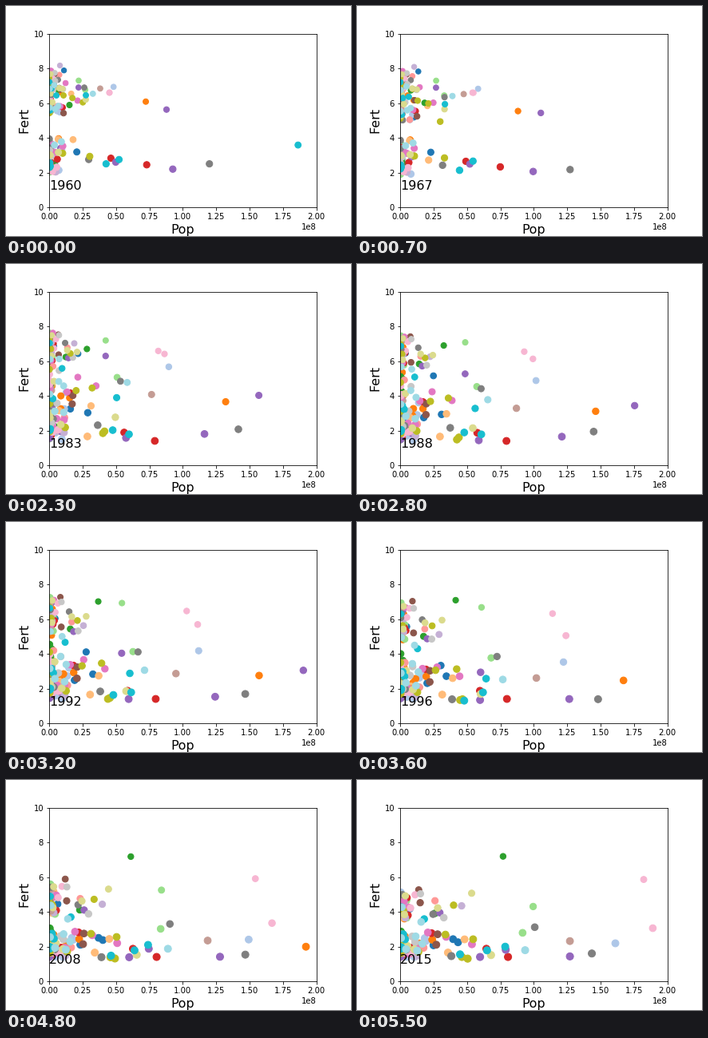
These frames come from a looping animation (432 px wide and 288 px high, 5600 ms). A matplotlib script:

```python
import numpy as np
import matplotlib.pyplot as plt
from matplotlib.animation import FuncAnimation

plt.rcParams["text.kerning_factor"] = 6

YEARS = np.arange(1960, 2016)
AGE = YEARS - YEARS[0]
LAG = 12  # years until births drive population growth
tracks = []  # (colour index, population per year, fertility per year)


def nation(color, pop, fert, mid, width=7, swing=0):
    """Fertility falls along an S-curve around `mid`; population (millions)
    grows between its two ends in step with earlier fertility.
    `swing` adds an early boom, a slump near 2000 and a population bulge."""
    high, low = fert

    def births(year):
        return low + (high - low) / (1 + np.exp((year - mid) / width))

    rate = np.maximum(births(YEARS - LAG) - 3 / high, 0.05)
    share = (np.cumsum(rate) - rate[0]) / rate[1:].sum()
    bulge = 1 + 0.2 * swing * np.sin(np.pi * AGE / AGE[-1])
    people = 1e6 * pop[0] * (pop[1] / pop[0]) ** share * bulge
    wave = np.exp(-AGE / 4) - np.exp(-((YEARS - 2000) / 6) ** 2)
    tracks.append((color, people, births(YEARS) + swing * wave))


# The large nations that stand apart from the crowd.
nation(0, (11.1, 39.6), (7.9, 2.4), 1988, 5)
nation(0, (20.7, 43.3), (3.2, 2.1), 1998, 9)
nation(1, (48.2, 161), (7, 2.05), 1990)
nation(2, (72.3, 204), (6.8, 1.75), 1978, 10)
nation(3, (17.9, 35.8), (4.2, 1.65), 1966, 3)
nation(3, (16.5, 48.2), (7.1, 2.4), 1974)
nation(4, (15.2, 77), (5.8, 7.2), 1979)
nation(5, (27, 91.6), (7.2, 2.5), 1985, 11)
nation(5, (22.1, 99.5), (7.3, 3.2), 2008)
nation(6, (46.2, 64.5), (2.85, 1.87), 1971, 3)
nation(6, (73, 80.7), (2.45, 1.4), 1971, 2)
nation(8, (87.8, 258), (5.75, 2.3), 1983)
nation(8, (22, 79), (6.9, 1.8), 1991, 4)
nation(8, (49.8, 59.8), (2.5, 1.4), 1978, 3, 0.1)
nation(8, (92.5, 127), (2.05, 1.43), 1985, 5, 0.15)
nation(9, (8.1, 46), (8.2, 4.3), 1988, 6)
nation(11, (38.2, 127), (7, 2.3), 1980, 6)
nation(12, (12.3, 34.4), (7.3, 2.5), 1984)
nation(12, (21.3, 53.7), (6.2, 2.1), 1985.5, 6)
nation(13, (45.2, 182.2), (6.6, 5.85), 1998, 4)
nation(13, (45, 189), (6.6, 2.95), 1997.5, 5)
nation(14, (26.3, 100.7), (8.2, 2.8), 1976, 14)
nation(14, (29.6, 38.3), (2.35, 1.45), 1992, 3, 0.4)
nation(14, (119.9, 143.4), (2.1, 1.6), 1990, 2.5, 0.4)
nation(16, (17.4, 54.6), (6.6, 2.3), 1983, 9)
nation(16, (25.2, 50.5), (6.8, 1.3), 1971, 6)
nation(16, (30.4, 46.2), (2.83, 1.4), 1981, 2.5, 0.1)
nation(16, (7.5, 40), (6.9, 4), 1998, 9)
nation(17, (10, 53.5), (6.85, 4.8), 1998, 9)
nation(17, (27.4, 68), (6.5, 1.5), 1976.5, 6)
nation(18, (27.5, 78.6), (7, 1.9), 1979, 9)
nation(18, (42.6, 44.8), (2.05, 1.55), 1990, 2.5, 0.45)
nation(18, (52.3, 65), (2.75, 1.78), 1971.5, 2)
nation(18, (186.2, 320), (3.7, 1.9), 1968, 3)
nation(19, (32.7, 93.5), (6.6, 1.75), 1986, 6)

# The crowd of small nations: early, middle and late fertility decline.
rng = np.random.default_rng(12)
families = (
    # high, low, mid year, growth
    ((2, 4), (1.4, 2), (1966, 1990), (1, 1.6)),
    ((5.5, 7.4), (1.8, 2.8), (1972, 1992), (2, 3.2)),
    ((6.2, 7.9), (3.3, 5), (1988, 2006), (2.8, 4.2)),
)
for n in range(145):
    high, low, mid, growth = (rng.uniform(*span) for span in families[n % 3])
    size = np.exp(rng.uniform(np.log(0.15), np.log(11)))
    nation(n % 20, (size, size * growth), (high, low), mid)

tracks.sort(key=lambda row: row[0])
colors = [plt.cm.tab20(row[0]) for row in tracks]
pops = np.array([row[1] for row in tracks])
ferts = np.array([row[2] for row in tracks])
# Dot area follows life expectancy: longer lives where fewer births.
areas = np.clip(78 - 4.8 * ferts + 0.2 * AGE, 40, 83)

fig, ax = plt.subplots(figsize=(6, 4), dpi=72)
fig.subplots_adjust(left=0.125, right=0.9, bottom=0.125, top=0.88)
ax.set_xlim(0, 2e8)
ax.set_ylim(0, 10)
ax.set_xticks(np.arange(9) * 0.25e8)
ax.set_xlabel("Pop", fontsize=16)
ax.set_ylabel("Fert", fontsize=16)
dots = ax.scatter(pops[:, 0], ferts[:, 0], s=areas[:, 0], c=colors)
label = ax.text(0, 1, str(YEARS[0]), fontsize=16)


def draw(i):
    dots.set_offsets(np.column_stack((pops[:, i], ferts[:, i])))
    dots.set_sizes(areas[:, i])
    label.set_text(str(YEARS[i]))
    return dots, label


anim = FuncAnimation(fig, draw, frames=len(YEARS), interval=100,
                     repeat=True, repeat_delay=0)
plt.show()
```
